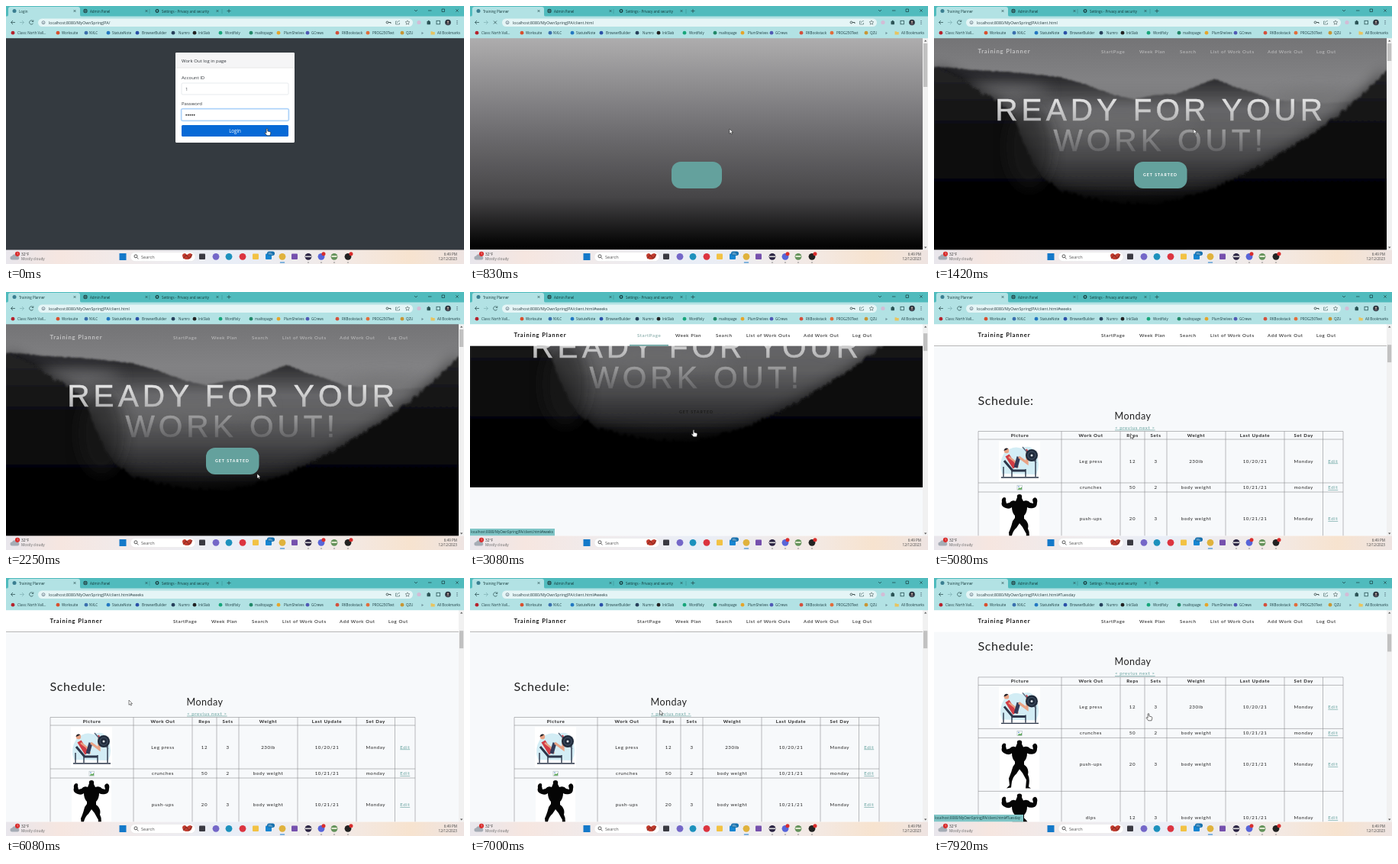
Write an HTML page that moves like this. It is 600x338 px and loops after 8000 ms.

```html
<!DOCTYPE html>
<html lang="en">
<head>
<meta charset="utf-8">
<title>Workout pages</title>
<style>
  html, body { margin: 0; width: 100%; height: 100%; overflow: hidden; }
  svg { display: block; width: 100vw; height: 100vh; }
  text { font-family: "Open Sans", sans-serif; white-space: pre; }
  .page text { font: 6.2px Lato, sans-serif; letter-spacing: .57px; fill: #222; }
  .page .bold { font-weight: 700; }
  .page .link { fill: #64a19d; text-decoration: underline; }
  .page .hero { font: 40.6px "Liberation Sans", Arial, sans-serif; letter-spacing: 5px; fill: url(#heroInk); stroke: url(#heroInk); stroke-width: .5px; }
  .page .brand { font-size: 7.7px; font-weight: 700; letter-spacing: .85px; }
</style>
</head>
<body>
<svg id="stage" viewBox="0 0 600 338"></svg>
<script>
const LOOP = 8000;
const LOADING = 420, LOADED = 1250, GO_WEEKS = 2830, GO_TUESDAY = 7745;
const WEEKS_TOP = 249;
const ROOT = 'localhost:8080/MyOwnSpringJPA/';
const TEAL = '#64a19d';

// Markup helpers
const text = (x, y, s, size = 4.7, attrs = '') => `<text x="${x}" y="${y}" font-size="${size}" ${attrs}>${s}</text>`;
const rect = (x, y, w, h, fill, attrs = '') => `<rect x="${x}" y="${y}" width="${w}" height="${h}" fill="${fill}" ${attrs}/>`;
const circle = (x, y, r, fill, attrs = '') => `<circle cx="${x}" cy="${y}" r="${r}" fill="${fill}" ${attrs}/>`;
const path = (d, fill, attrs = '') => `<path d="${d}" fill="${fill}" ${attrs}/>`;
const line = (d, color = '#25484a', width = .7) => path(d, 'none', `stroke="${color}" stroke-width="${width}"`);
const group = (id, body, attrs = '') => `<g id="${id}" ${attrs}>${body}</g>`;
const cross = (x, y, r, color, width) => line(`M${x - r},${y - r}l${2 * r},${2 * r}m0,${-2 * r}l${-2 * r},${2 * r}`, color, width);
const mist = (x, y, rx, ry, color, alpha) => `<ellipse cx="${x}" cy="${y}" rx="${rx}" ry="${ry}" fill="${color}" opacity="${alpha}" filter="url(#mist)"/>`;
const gradient = (id, y1, y2, stops) =>
  `<linearGradient id="${id}" gradientUnits="userSpaceOnUse" x1="0" x2="0" y1="${y1}" y2="${y2}">` +
  stops.map(([at, color, alpha = 1]) => `<stop offset="${at}" stop-color="${color}" stop-opacity="${alpha}"/>`).join('') +
  '</linearGradient>';

// Hill outline through a few points, roughened with tree tops
function hill(points, roughness) {
  let d = `M${points[0][0]},320`;
  for (let i = 1; i < points.length; i++) {
    const [x0, y0] = points[i - 1], [x1, y1] = points[i];
    const steps = Math.max(1, Math.round((x1 - x0) / 2));
    for (let k = 0; k <= steps; k++) {
      const x = x0 + (x1 - x0) * k / steps;
      const noise = Math.abs(Math.sin(x * 12.9898) * 43758.5453) % 1;
      d += `L${x.toFixed(1)},${(y0 + (y1 - y0) * k / steps - noise * roughness).toFixed(1)}`;
    }
  }
  return d + `V320Z`;
}

const defs = `<defs>
  ${gradient('blank', 42, 320, [[0, '#aeadae'], [.42, '#717073'], [.75, '#464547'], [.95, '#0b0b0b'], [1, '#000']])}
  ${gradient('sky', 42, 320, [[0, '#747476'], [.2, '#828284'], [.4, '#747476'], [1, '#000']])}
  ${gradient('far', 95, 295, [[0, '#2c2c2e'], [.09, '#454547'], [.2, '#666668'], [.36, '#5e5e60'], [.5, '#4a4a4c'], [.64, '#303032'], [.78, '#171718'], [1, '#000']])}
  ${gradient('near', 80, 280, [[0, '#252526'], [.4, '#0f0f10'], [1, '#000']])}
  ${gradient('floor', 235, 295, [[0, '#000', 0], [.5, '#000', .7], [1, '#000']])}
  ${gradient('heroInk', 119, 192, [[0, '#e8e8e8'], [.42, '#b4b4b5'], [.56, '#a0a0a1'], [1, '#626264']])}
  <linearGradient id="task"><stop offset="0" stop-color="#e8e6ec"/><stop offset=".12" stop-color="#f6e6e0"/><stop offset=".25" stop-color="#f1eaea"/><stop offset=".5" stop-color="#e9eef7"/><stop offset=".75" stop-color="#f3e9e4"/><stop offset=".88" stop-color="#f7e3cf"/><stop offset="1" stop-color="#eee4e2"/></linearGradient>
  <filter id="mist" x="-30%" y="-100%" width="160%" height="300%"><feGaussianBlur stdDeviation="10"/></filter>
  <filter id="soft"><feGaussianBlur stdDeviation=".9"/></filter>
  <clipPath id="view"><rect y="42" width="600" height="277.5"/></clipPath>
  <clipPath id="masthead"><rect y="42" width="593" height="277.5"/></clipPath>
</defs>`;

function browserTop() {
  const tabText = (x, s, id = '') => text(x, 8.5, s, 4.5, `fill="#14393a" id="${id}"`);
  const bookmarks = [
    [9, 15, 'Class: North Vall...', '#b5232d'], [68, 73, 'Worksuite', '#d8502e'], [105, 109, 'NVLC', '#3b70ae'],
    [134, 139, 'StatuteNote', '#2378c2'], [172, 178, 'BrowserBuilder', '#2b50a8'], [219, 226, 'Numro', '#27415c'],
    [247, 252, 'InkSlab', '#222'], [281, 287, 'Wordfixly', '#17a67a'], [321, 326, 'mailtopage', '#218868'],
    [357, 364, 'PlumShelves', '#e5a52b'], [395, 400, 'GCrews', '#5059b5'], [434, 440, 'RKBookstack', '#d3503c'],
    [474, 480, 'PROG250Text', '#e16d3b'], [519, 524, 'QZU', '#c79635']
  ];
  return rect(0, 0, 600, 14, '#50bbbd') + rect(0, 13.5, 600, 28.7, '#b2e2e4') +
    path('M1,14Q3,14 3,11V4Q3,1 6,1H94Q97,1 97,4V11Q97,14 99,14Z', '#b2e2e4') +
    circle(11, 6.5, 2.5, '#3a7e91') + tabText(17, 'Login', 'tabTitle') + cross(90, 6.5, 1.4) +
    circle(104, 6.5, 2.7, '#24484a') + line('M101.5,6.5h5M104,4v5', '#50bbbd', .5) + tabText(110, 'Admin Panel') + cross(184, 6.5, 1.4) +
    circle(198, 6.5, 1.8, 'none', 'stroke="#173d3f" stroke-width="1.3"') + tabText(204, 'Settings - Privacy and security') + cross(277, 6.5, 1.4) +
    line('M188,4v6M283,4v6', '#35898b', .5) + line('M289.5,6.5h5M292,4v5') +
    line('M535,5l2,2l2,-2M553,6h4.5M571,4h3.5v3.5h-3.5z', '#173d3f') + cross(591, 6, 1.7) +
    line('M12,21.5H6.5m2.5,-2.5l-2.5,2.5l2.5,2.5', '#33575a', .8) + line('M18,21.5h5.5m-2.5,-2.5l2.5,2.5l-2.5,2.5', '#84b5b8', .8) +
    group('reload', line('M35.4,20a2.6,2.6 0 1 0 .2,2.6M35.8,18.5v2h-2', '#33575a', .8)) +
    group('stop', cross(33, 21.5, 2, '#33575a', .8)) +
    rect(42, 16.5, 491, 10.5, '#e5f5f6', 'rx="5.2"') + circle(49, 21.7, 2, 'none', 'stroke="#456" stroke-width=".6"') + line('M49,21.2v1.7', '#456', .6) +
    text(56, 23.6, '', 5.2, 'id="url" fill="#263c40"') +
    circle(499.5, 21.5, 1.4, 'none', 'stroke="#344" stroke-width=".8"') + line('M501,21.5h3v1.5', '#344', .9) +
    line('M512,20h-1.5v4h5v-2M512,22.5q.5,-3 4,-3', '#466', .6) +
    path('M526,18.8l.8,1.8 2,.2-1.5,1.4.4,2-1.7-1-1.7,1 .4-2-1.5-1.4 2-.2z', 'none', 'stroke="#344" stroke-width=".5"') +
    circle(541, 21.5, 2.6, '#d3bcd6') + rect(551.5, 20, 4.5, 4.2, '#2c5557', 'rx=".6"') + circle(553.7, 19.8, 1.1, '#2c5557') +
    rect(564, 19.3, 4.5, 4.5, 'none', 'stroke="#2c5557" stroke-width=".8"') +
    circle(579, 21.5, 3.8, '#28313c') + circle(579, 20.7, 1.3, '#b7a39a') + path('M576.5,24q2.5,-3 5,0z', '#8b7780') +
    [19.5, 21.5, 23.5].map(y => circle(591, y, .55, '#234')).join('') +
    bookmarks.map(([ix, tx, s, color]) => circle(ix, 35.2, 2.4, color) + text(tx, 37, s, 4.5, 'fill="#1d3d42"')).join('') +
    text(544, 37, '»', 5.5, 'fill="#234"') + path('M556.5,33.3h2l.7,.7h2.5v3.5h-5.2z', '#e8c45f') + text(565, 37, 'All Bookmarks', 4.5, 'fill="#1d3d42"');
}

function taskbar() {
  const icons = [
    [257, '#3a3a42', 1], [275, '#7467c8'], [292, '#1d91bd'], [310, '#dc3440'], [327, '#f2c244', 1], [344, '#1786d1', 1],
    [362, '#e0b23c'], [378, '#7650ad', 1], [396, '#2c2544'], [413, '#5865d8'], [430, '#65935c'], [448, '#222']
  ];
  const icon = ([x, color, square]) => square ? rect(x - 4, 324.5, 8, 7.5, color, 'rx="1"') : circle(x, 328.3, 4.4, color);
  const badge = (x, r = 2.5) => circle(x, 324.8, r, '#d92d2d');
  return rect(0, 319.5, 600, 18.5, 'url(#task)') +
    path('M8,332.5a2.5,2.5 0 0 1 0,-5a3.5,3.5 0 0 1 6.5,0a2.5,2.5 0 0 1 .5,5z', '#a5acb5') + badge(15, 3.1) + text(14, 326.4, '1', 4, 'fill="#fff"') +
    text(20, 326.7, '32°F', 4.8, 'fill="#333"') + text(20, 333.4, 'Mostly cloudy', 4.8, 'fill="#666"') +
    rect(148.5, 324, 9, 9, '#1479c9') +
    rect(163, 322.6, 85, 12, '#fff', 'rx="6" stroke="#ddd" stroke-width=".4"') + circle(170, 327.8, 2, 'none', 'stroke="#333" stroke-width=".8"') + line('M171.5,329.4l2,2', '#333', .8) +
    text(177, 330.7, 'Search', 5.6, 'fill="#555"') + path('M231,326q3,-4 6,0q5,-4 7,0q-1,6 -7,6q-6,0 -6,-6z', '#c13a2d') + line('M232,331l4,-5l4,5l4,-6', '#6b251f', .8) +
    icons.map(icon).join('') + rect(342, 321.5, 10, 5.5, '#1670ad', 'rx="2.7"') + text(343.4, 326, '99+', 3.6, 'fill="#fff"') +
    [416, 452].map(x => badge(x)).join('') + rect(392, 327.5, 8, 1.6, '#ddd') + rect(426.5, 327, 7, 2, '#dfe7cf') +
    [396, 413, 430, 448].map(x => rect(x - 1.2, 335.5, 2.4, .9, '#888', 'rx=".4"')).join('') + rect(358.8, 335.4, 6.4, 1, '#1479c9', 'rx=".5"') +
    text(591, 326.8, '6:49 PM', 4.6, 'text-anchor="end" fill="#444"') + text(591, 333.4, '12/12/2023', 4.6, 'text-anchor="end" fill="#444"');
}

function loginPage() {
  return rect(0, 42, 600, 278, '#343a40') + rect(222, 61, 156, 118, '#fff', 'rx="1.6"') +
    path('M222,81V62.6q0,-1.6 1.6,-1.6H376.4q1.6,0 1.6,1.6V81z', '#f5f5f6') + line('M222,81h156', '#d5d5d6', .5) +
    text(230, 73.6, 'Work Out log in page', 6, 'fill="#30353a"') + text(230, 95.6, 'Account ID', 6, 'fill="#30353a"') +
    rect(230, 101, 140, 15, '#fff', 'rx="1.5" stroke="#ced4da" stroke-width=".5"') + text(235, 110.7, '1', 6, 'fill="#495057"') +
    text(230, 129.6, 'Password', 6, 'fill="#30353a"') +
    rect(229.5, 134.5, 141, 16, '#fff', 'rx="2" stroke="#bfdeff" stroke-width="1.6"') + rect(230, 135, 140, 15, '#fff', 'rx="1.5" stroke="#7fb6ef" stroke-width=".6"') +
    [0, 1, 2, 3, 4].map(i => circle(236.2 + i * 2.6, 142.7, .95, '#333')).join('') +
    rect(230, 156, 140, 15, '#0769d6', 'rx="1.5"') + text(300, 165.8, 'Login', 6.2, 'text-anchor="middle" fill="#fff"');
}

function mountains() {
  const far = [[0, 80], [60, 85], [120, 89], [165, 94], [200, 104], [235, 117], [262, 123], [290, 117], [318, 116], [345, 105], [368, 96], [392, 106], [418, 114], [445, 124], [520, 128], [593, 122]];
  const left = [[0, 82], [30, 97], [57, 114], [85, 128], [105, 150], [118, 185], [135, 220], [165, 245], [230, 260], [330, 266]];
  const right = [[270, 266], [320, 256], [370, 240], [408, 223], [440, 205], [471, 186], [505, 164], [535, 142], [555, 125], [575, 106], [593, 86]];
  const slope = points => path(hill(points, 3), '#000', 'opacity=".8" filter="url(#mist)"') + path(hill(points, 6), 'url(#near)', 'filter="url(#soft)"');
  return rect(0, 42, 593, 278, 'url(#sky)') +
    path(hill(far, 1.5), 'url(#far)', 'filter="url(#soft)"') +
    mist(95, 112, 55, 9, '#777779', .8) + mist(505, 126, 60, 14, '#747476', .8) + mist(245, 150, 100, 16, '#6f6f71', .6) +
    slope(left) + slope(right) +
    mist(125, 185, 30, 55, '#1c1c1d', .6) +
    rect(0, 235, 593, 85, 'url(#floor)');
}

function legPress() {
  return rect(85, 195, 54, 53, '#fff') + path('M89,238Q84,224 92,211Q103,200 115,205Q127,198 134,212Q140,227 134,239Z', '#d3edf5') +
    line('M91,242V229M88,243h49M133,242V220M102,242V232M120,242V232', '#2a3447', 1.4) + line('M92,221L103,234H120', '#2c374b', 3) +
    line('M96,214L106,230', '#d23d45', 6) + circle(95, 208, 3.2, '#e9a385') + path('M91.5,208q1,-5 6,-3l-3,2z', '#25252d') +
    line('M98,216L106,222L110,230', '#e9a385', 2.4) + line('M107,230L111,216', '#343b58', 5) + line('M111,216L122,224L122,209', '#e9a385', 3.3) +
    line('M121,206l5,12', '#d23d45', 2) + line('M116,203L134,224', '#59677a', 1.4) +
    circle(128, 214, 8, '#202b3b') + circle(128, 214, 5, 'none', 'stroke="#526278" stroke-width=".8"') + circle(128, 214, 1.5, '#dde5eb');
}

const bodyBuilder = y => `<g transform="translate(112 ${y})">` + rect(-26, 2.5, 52, 65, '#fff') +
  path('M-3,7Q-4,3 0,3Q4,3 3,8L5,12Q11,10 14,14L18,15L17,10Q19,6 22,8Q24,10 23,14Q23,20 18,21Q13,22 10,20Q10,27 6,31L6,35Q13,40 11,48Q14,53 12,64L15,66H8L9,55L4,46L0,41L-4,47Q-8,50 -10,57L-11,65L-17,66L-13,62L-14,53Q-11,46 -10,42Q-9,37 -6,34L-6,31Q-10,27 -10,20Q-13,23 -18,21Q-25,19 -23,13Q-24,8 -20,7Q-17,7 -18,11L-17,15L-13,14Q-10,10 -5,12Z', '#050505') + '</g>';

function schedule() {
  const edges = [58, 167, 244, 276, 305, 382, 459, 509.5, 536];
  const rows = [
    [182.5, 10.5, ['Picture', 'Work Out', 'Reps', 'Sets', 'Weight', 'Last Update', 'Set Day', '']],
    [193, 57, ['', 'Leg press', '12', '3', '230ib', '10/20/21', 'Monday', 'Edit']],
    [250, 12, ['', 'crunches', '50', '2', 'body weight', '10/21/21', 'monday', 'Edit']],
    [262, 70, ['', 'push-ups', '20', '3', 'body weight', '10/21/21', 'Monday', 'Edit']],
    [332, 70, ['', 'dips', '12', '3', 'body weight', '10/21/21', 'Monday', 'Edit']]
  ];
  const cells = rows.map(([y, h, values], r) => line(`M58,${y}H536`, '#858789', .55) + values.map((s, c) =>
    text((edges[c] + edges[c + 1]) / 2, y + h / 2 + 2, s, 6.2, `text-anchor="middle" class="${r ? (c === 7 ? 'link' : '') : 'bold'}"`)).join('')).join('');
  return text(57.5, 148, 'Schedule:', 16, 'style="font-size:16.2px;letter-spacing:.5px"') +
    text(236.5, 167, 'Monday', 12.5, 'style="font-size:12.6px;letter-spacing:.45px"') +
    text(237, 179.6, '&lt; previus next &gt;', 6.2, 'class="link"') +
    legPress() + bodyBuilder(262) + bodyBuilder(332) +
    rect(109, 253.2, 6.5, 6, '#fff', 'stroke="#a9b7bd" stroke-width=".6"') + path('M109.5,258.8l2,-2.5 1.5,1 2,-2v3.5z', '#5ca657') + circle(111, 255, .8, '#4b84cc') +
    cells + line(edges.map(x => `M${x},182.5V402`).join('') + 'M58,402H536', '#858789', .55);
}

function clientPage() {
  const links = [[219, 'StartPage'], [269, 'Week Plan'], [322, 'Search'], [362, 'List of Work Outs'], [437, 'Add Work Out'], [501, 'Log Out']];
  return rect(0, 42, 600, 278, '#f7f9fb') +
    group('scroller',
      rect(0, 42, 593, 277.5, 'url(#blank)') +
      group('photo', mountains() + text(80.3, 150, 'READY FOR YOUR', 40, 'class="hero"') + text(156.5, 190, 'WORK OUT!', 40, 'class="hero"'), 'clip-path="url(#masthead)"') +
      group('button', rect(262, 204, 69.5, 35, TEAL, 'id="buttonBox" rx="12"')) +
      text(274, 223.3, 'GET STARTED', 5.2, 'id="buttonText" class="bold" style="font-size:5.2px;letter-spacing:1.05px"') +
      group('schedule', schedule(), `transform="translate(0 ${WEEKS_TOP})"`)) +
    group('nav', rect(0, 42, 593, 28.7, '#fff', 'id="navBox"') +
      group('navText', text(57.5, 59, 'Training Planner', 7.7, 'class="brand"') +
        links.map(([x, s], i) => text(x, 58.5, s, 6.2, i ? '' : 'id="startLink"')).join('')) +
      rect(209, 69, 51, 1.6, TEAL, 'id="underline"')) +
    rect(593, 42, 7, 278, '#f1f1f1') + path('M595,46.5l1.7,-2 1.7,2zM595,315.5l1.7,2 1.7,-2z', '#555') + rect(594, 49, 5.2, 23, '#c1c1c1', 'id="thumb"');
}

const arrow = path('M0,0V6.3L1.5,5L2.5,7.1L3.5,6.6L2.6,4.6H4.5Z', '#fff', 'stroke="#111" stroke-width=".5"');
const hand = path('M-.9,0Q0,-1 .8,0V3L4,3.8Q5,4.2 4.8,5.5L4,8.8H-.2L-2.8,5.5Q-2.8,4.3 -1.8,4.7L-.9,5.5Z', '#fff', 'stroke="#111" stroke-width=".6"');

const stage = document.getElementById('stage');
stage.innerHTML = defs +
  group('login', loginPage()) +
  group('client', clientPage(), 'class="page" clip-path="url(#view)"') +
  group('status', rect(0, 310, 111, 9.5, '#80c5c6', 'id="statusBox"') + text(1, 316.4, '', 4.5, 'id="statusText" fill="#163b3d"')) +
  browserTop() + taskbar() +
  group('cursor', group('arrow', arrow) + group('hand', hand));

const el = id => document.getElementById(id);
const show = (id, on) => el(id).setAttribute('display', on ? 'inline' : 'none');
const set = (id, attrs) => { for (const k in attrs) el(id).setAttribute(k, attrs[k]); };
const ramp = (t, from, to) => Math.min(1, Math.max(0, (t - from) / (to - from)));
const ease = p => p < .5 ? 2 * p * p : 1 - 2 * (1 - p) ** 2;
const mix = (a, b, p) => a + (b - a) * p;

const cursorPath = [[0, 342, 161], [450, 342, 161], [830, 340, 161], [1450, 340, 161], [2200, 329, 238], [2280, 329, 238], [2600, 296, 224],
  [2780, 295, 222], [3060, 293, 181], [3300, 293, 181], [3900, 297, 196], [4700, 297, 196], [5700, 161, 160], [6400, 161, 160], [7350, 281, 178], [8000, 281, 178]];

function cursorAt(t) {
  const i = Math.max(1, cursorPath.findIndex(p => p[0] > t));
  const [t0, x0, y0] = cursorPath[i - 1], [t1, x1, y1] = cursorPath[i];
  const p = ease(ramp(t, t0, t1));
  return [mix(x0, x1, p), mix(y0, y1, p)];
}

function draw(t) {
  const loggedIn = t >= LOADING, loaded = t >= LOADED;
  const scroll = WEEKS_TOP * ease(ramp(t, GO_WEEKS, GO_WEEKS + 700)) + 416 * ease(ramp(t, GO_TUESDAY, GO_TUESDAY + 700));
  const hash = t >= GO_TUESDAY ? '#Tuesday' : t >= GO_WEEKS ? '#weeks' : '';

  show('login', !loggedIn);
  show('client', loggedIn);
  el('tabTitle').textContent = loggedIn ? 'Training Planner' : 'Login';
  el('url').textContent = ROOT + (loggedIn ? 'client.html' + hash : '');
  show('stop', loggedIn && !loaded);
  show('reload', !loggedIn || loaded);

  show('photo', loaded);
  show('buttonText', loaded);
  show('nav', loaded);
  set('scroller', { transform: `translate(0 ${-scroll})` });
  set('thumb', { y: 49 + scroll * .081, height: loaded ? 23 : 57 });
  set('buttonBox', { x: loaded ? 262 : 264, width: loaded ? 69.5 : 66, opacity: 1 - ramp(t, 2700, 2850) });
  el('buttonText').style.fill = t < 2750 ? '#fff' : '#1c1c1c';

  const solid = ramp(t, GO_WEEKS, GO_WEEKS + 180);
  const active = t >= GO_WEEKS + 100 && t < 5000;
  set('navBox', { opacity: solid });
  set('navText', { transform: `translate(0 ${3 * (1 - solid)})`, opacity: mix(.55, 1, solid) });
  const ink = Math.round(mix(255, 20, solid));
  for (const node of el('navText').children) node.style.fill = `rgb(${ink},${ink},${ink})`;
  if (active) el('startLink').style.fill = '#78a19e';
  show('underline', active);

  const overButton = t >= 2420 && t < 3450, overNext = t >= 7280;
  show('status', overButton || overNext);
  el('statusText').textContent = ROOT + 'client.html' + (overNext ? '#Tuesday' : '#weeks');
  set('statusBox', { width: overNext ? 117 : 111 });

  const pointing = t < LOADING || overButton || overNext;
  set('cursor', { transform: `translate(${cursorAt(t).join(' ')})` });
  show('hand', pointing);
  show('arrow', !pointing);
}

const start = performance.now();
function tick() {
  draw((performance.now() - start) % LOOP);
  requestAnimationFrame(tick);
}
tick();
</script>
</body>
</html>
```
